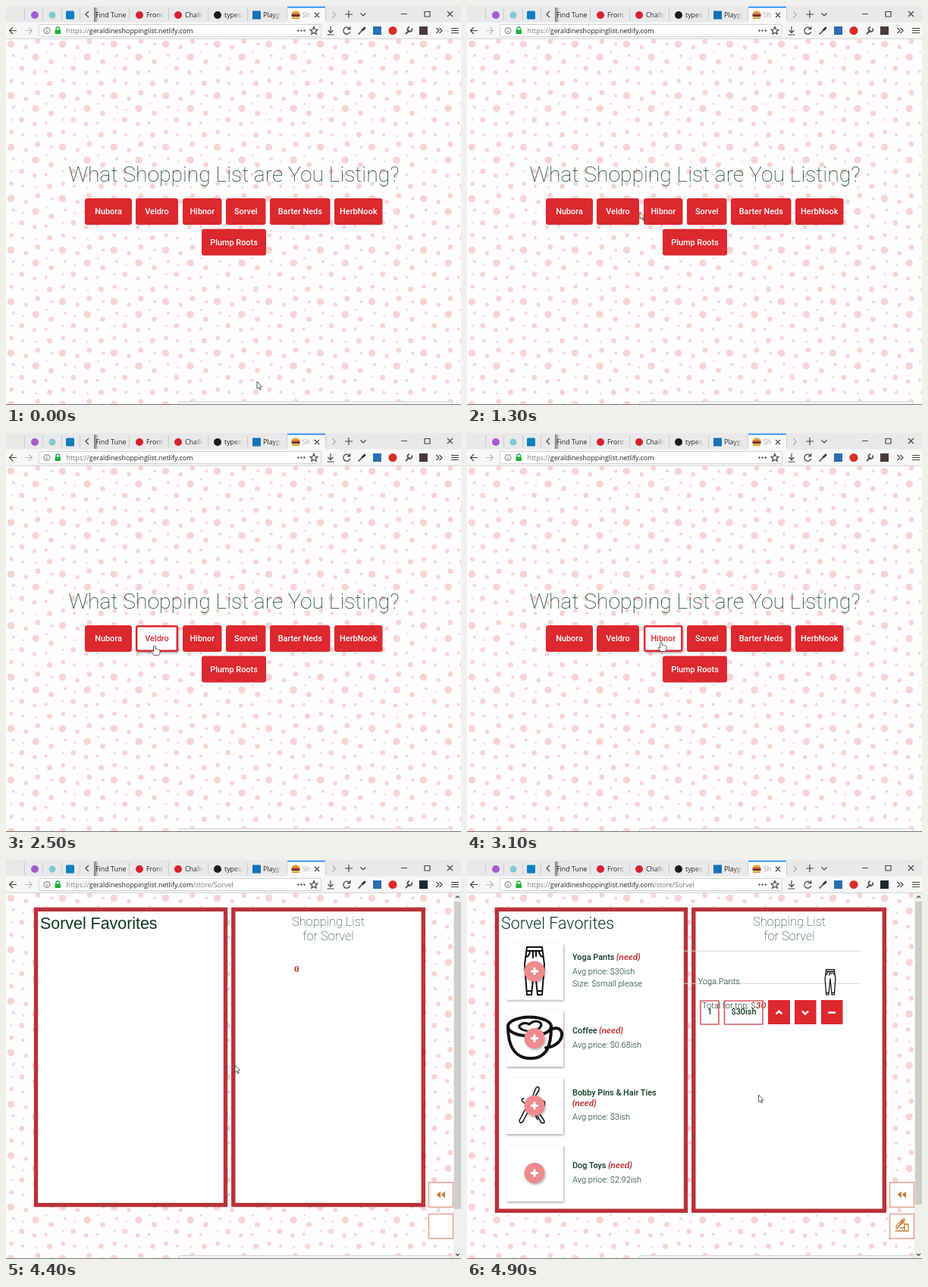
Animation, 600 px wide and 527 px high, one loop 5 s. Source, as an HTML page:

```html
<!DOCTYPE html>
<html lang="en">
<head>
<meta charset="utf-8">
<title>Shopping list</title>
<style>
html, body { margin: 0; width: 100%; height: 100%; overflow: hidden; background: #fff; }
svg { display: block; width: 600px; height: 527px; font-family: Roboto, sans-serif; }
.ui { font-family: "Open Sans", "Noto Sans", sans-serif; font-size: 8.9px; fill: #222; }
.line { fill: none; stroke: #444; stroke-width: 1.2; }
.mid { text-anchor: middle; }
.label { font-size: 10.9px; font-weight: 500; text-anchor: middle; }
.thin { font-weight: 100; fill: #0c3b22; text-anchor: middle; }
.name { font-size: 10.9px; font-weight: 500; fill: #0c3b22; }
.info { font-size: 11.1px; font-weight: 300; fill: #0c3b22; }
.need { font: italic 700 12.2px Lato, sans-serif; fill: #c22f35; }
.ink { fill: none; stroke: #111; stroke-linecap: round; stroke-linejoin: round; }
</style>
</head>
<body>
<svg viewBox="0 0 600 527">
  <defs>
    <pattern id="dots" x="-1" y="43" width="68" height="68" patternUnits="userSpaceOnUse"></pattern>
    <linearGradient id="fade">
      <stop offset="0" stop-color="#e9e9ec" stop-opacity="0"/>
      <stop offset="1" stop-color="#e9e9ec"/>
    </linearGradient>
    <linearGradient id="shade">
      <stop offset="0" stop-color="#777"/>
      <stop offset="1" stop-color="#e9e9ec"/>
    </linearGradient>
    <filter id="shadow" x="-20%" y="-20%" width="150%" height="150%">
      <feDropShadow dx="1" dy="1.5" stdDeviation="1.5" flood-color="#000" flood-opacity=".35"/>
    </filter>
    <g id="pants" class="ink">
      <path d="M-10-31H10L13-8 10 32H4L0-8-4 32H-10L-13-8ZM-10-26H10M-2-25V-17M2-25V-19M-10 27H-4M4 27H10M-11-18Q-7-19-6-25M11-18Q7-19 6-25"/>
    </g>
    <g id="plus">
      <circle r="13.5" fill="#ee8b8d" filter="url(#shadow)"/>
      <path d="M-5 0H5M0-5V5" stroke="#fff" stroke-width="3"/>
    </g>
  </defs>

  <rect y="43" width="600" height="484" fill="#fffdfe"/>
  <rect y="43" width="600" height="484" fill="url(#dots)"/>

  <g id="home">
    <text class="thin" x="300.5" y="232" font-size="28.3">What Shopping List are You Listing?</text>
    <g id="stores"></g>
  </g>

  <g id="store">
    <rect x="590" y="43" width="10" height="484" fill="#f0f0f0"/>
    <rect id="thumb" x="591" y="55" width="9" fill="#cdcdcd"/>
    <path d="M593 50 595.5 47.500 598 50M593 520 595.5 522.500 598 520" class="line"/>
    <g fill="#fff" stroke="#b93238" stroke-width="5.4">
      <rect id="left" x="39.500" y="65.300"/>
      <rect id="right" y="65.300"/>
    </g>
    <text id="heading" x="45" y="91" font-size="21.4" fill="#0c3b22">Sorvel Favorites</text>
    <g class="thin" font-size="16.4">
      <text x="425" y="87">Shopping List</text>
      <text x="425" y="106">for Sorvel</text>
    </g>
    <text id="zero" x="380" y="148" style="font:700 13px 'Liberation Serif',serif" fill="#c22f35">0</text>

    <g id="loaded">
      <g id="items"></g>
      <path d="M285 120.200H518M285 163.200H518" stroke="#d5d2c6"/>
      <text id="total" class="info" x="310"><tspan>Total for trip: $</tspan><tspan id="sum" class="need"></tspan><tspan> ish</tspan></text>
      <g id="entry">
        <text class="info" x="304.500" y="164">Yoga Pants</text>
        <use href="#pants" transform="translate(479 161) scale(.53)" stroke-width="2.4"/>
        <g fill="none" stroke="#dd5a5e" stroke-width="1.6">
          <path d="M308 186H332V217H308ZM339.500 186H390V217H339.500Z"/>
        </g>
        <text class="name mid" x="320" y="204">1</text>
        <text class="name mid" x="365" y="204">$30ish</text>
        <path d="M397 185H426V217H397ZM432 185H460.500V217H432ZM467 185H495.500V217H467Z" fill="#dd282e"/>
        <path d="M407.500 203.500 411.500 199.500 415.500 203.500M442 199.500 446 203.500 450 199.500M476.500 201.500H486" fill="none" stroke="#fff" stroke-width="2.4"/>
      </g>
    </g>

    <g fill="#fff" stroke="#e8a88f" stroke-width="1.6">
      <rect x="557.500" y="426" width="32" height="32.500"/>
      <rect x="557.500" y="467.500" width="32" height="32.500"/>
    </g>
    <path d="M573 437.500V446.500L567.500 442ZM579 437.500V446.500L573.500 442Z" fill="#c8803f"/>
    <g id="pen" class="ink" style="stroke:#c8803f" stroke-width="1.3">
      <path d="M565 490H576M566 486Q566 481 570 479L575 474Q578 473 577 476L573 481M571 486H576Q578 482 576 479M577 481H582V490H577Z"/>
      <path d="M575 476 567 487" stroke-width="2"/>
    </g>
  </g>

  <g id="browser">
    <rect width="600" height="22" fill="#e9e9ec"/>
    <rect y="21.500" width="600" height="21.500" fill="#f7f7f8"/>
    <path d="M0 43.200H600" stroke="#cfcfd2"/>
    <rect x="371" y="1" width="50" height="21" fill="#f9f9fa"/>
    <rect x="371" y=".8" width="50" height="1.6" fill="#1684f5"/>
    <path d="M24.500 3V19M48.500 3V19M73.500 3V19M97.500 3V19M162.500 3V19M214.500 3V19M266.500 3V19M318.500 3V19M370.500 3V19M421.500 3V19" stroke="#cbcbce"/>
    <rect x="116" y="2" width="6" height="19" fill="url(#shade)"/>
    <circle cx="38" cy="12" r="5" fill="#a55bd0"/>
    <circle cx="61" cy="12" r="4.500" fill="#7fcbd3"/>
    <rect x="79" y="6.500" width="11" height="11" rx="1.500" fill="#0d7fc2"/>
    <path class="line" d="M109 7 105 11 109 15"/>
    <g id="tabs" class="ui"></g>
    <g>
      <path d="M377 10Q377 6.500 382 6.500T387 10Z" fill="#e5a13a"/>
      <path d="M376.500 11H387.500" stroke="#c23b2f" stroke-width="1.800"/>
      <path d="M376.500 13H387.500" stroke="#593116" stroke-width="2"/>
      <path d="M377 14.500H387V17H377Z" fill="#e5a13a"/>
    </g>
    <text class="ui" x="391" y="15" style="fill:#aaa">Sh</text>
    <path class="line" d="M407 9 413 15M413 9 407 15M447 11H457M452 6V16M467.500 9.500 471 13 474.500 9.500M521 10.500H529M552 7.500H559V14H552ZM582 7 589 14M589 7 582 14"/>
    <path class="line" d="M430.500 7.500 434.500 11.500 430.500 15.500" style="stroke:#aaa"/>

    <rect x="43.500" y="24.500" width="372" height="16" rx="1.500" fill="#fff" stroke="#d2d2d5"/>
    <path class="line" d="M14 32.500H4.500M9 28 4.500 32.500 9 37"/>
    <path class="line" d="M25 32.500H34.500M30 28 34.500 32.500 30 37" style="stroke:#bbb"/>
    <circle cx="54" cy="32.500" r="4" fill="none" stroke="#777"/>
    <path d="M54 30V31M54 32V35" stroke="#777"/>
    <rect x="64.500" y="31.500" width="7.500" height="5.500" rx=".8" fill="#1fb13a"/>
    <path d="M66 32V30Q66 28 68.250 28T70.500 30V32" fill="none" stroke="#1fb13a" stroke-width="1.300"/>
    <text class="ui" x="79.500" y="36"><tspan fill="#777">https://</tspan><tspan>geraldineshoppinglist.netlify.com</tspan><tspan id="path" fill="#777"></tspan></text>
    <g fill="#555"><circle cx="385.500" cy="32.500" r="1.200"/><circle cx="389.500" cy="32.500" r="1.200"/><circle cx="393.500" cy="32.500" r="1.200"/></g>
    <path class="line" d="M406 27.500 407.500 31 411 31.300 408.300 33.700 409.200 37.300 406 35.300 402.800 37.300 403.700 33.700 401 31.300 404.500 31Z" stroke-width="1"/>
    <path class="line" d="M428 27V35M424.500 32 428 35.500 431.500 32M423.500 38H432.500"/>
    <path class="line" d="M453 30A4.500 4.500 0 1 0 453.700 34M453.700 27V30.700H450"/>
    <path d="M464.500 37.500 470.500 31.500" stroke="#667" stroke-width="1.800"/>
    <path d="M470.500 31.500 473 29" stroke="#333" stroke-width="2.800" stroke-linecap="round"/>
    <rect x="484" y="27" width="11" height="11" fill="#2c6fae"/>
    <circle cx="510" cy="32.500" r="5.500" fill="#dc2d25"/>
    <path d="M527 37 532 32" stroke="#555" stroke-width="2"/>
    <path d="M535 29.500A3 3 0 1 1 532 28" fill="none" stroke="#555" stroke-width="1.800"/>
    <rect id="addon" x="545" y="27" width="11" height="11"/>
    <path class="line" d="M567.500 29 571 32.500 567.500 36M571.500 29 575 32.500 571.500 36M587 29.500H597M587 32.500H597M587 35.500H597"/>
  </g>

  <path d="M227.500 527V524Q227.500 522.500 229 522.500H586Q588.500 522.500 588.500 525V527Z" fill="#f3f3f4" stroke="#d5d5d8"/>
  <path d="M0 526.500H600" stroke="#777"/>

  <g id="arrow"><path d="M0 0V9.500L2.200 7.600 3.700 11 5.200 10.300 3.700 7H6.500Z" fill="#fff" stroke="#333" stroke-width=".8"/></g>
  <g id="hand"><path d="M-1.300.8Q0-.8 1.300.8V4.300Q2.500 3.500 3.300 4.600 4.600 4 5.200 5.200 6.800 4.800 7 6.300V9.500L5.700 12.500H-.7L-4 7.700Q-3.300 6-1.300 7.800Z" fill="#fff" stroke="#333" stroke-width=".8"/></g>
</svg>
<script>
const LOOP = 5000, STEP = 100, OPEN = 4300, LOADED = 4500, ADDED = 4900;
const RED = '#dd282e';
const $ = id => document.getElementById(id);
const show = (id, on) => $(id).setAttribute('display', on ? 'inline' : 'none');
const set = (el, attrs) => Object.entries(attrs).forEach(([k, v]) => el.setAttribute(k, v));

// bubble wallpaper: centre and radius in a 100-unit tile
const bubbles = [
  [11, 11, 7], [59, 36, 7], [16, 33, 3], [79, 64, 3], [34, 87, 3], [90, 11, 3],
  [12, 82, 4], [40, 17, 4], [63, 5, 5], [57, 66, 4], [86, 87, 5], [32, 58, 5],
  [89, 45, 5], [80, 27, 2], [60, 89, 2], [35, 39, 2], [12, 58, 2]
];
$('dots').innerHTML = '<g transform="scale(.68)" fill="#f8d4d4">' +
  bubbles.map(([x, y, r]) => `<circle cx="${x}" cy="${y}" r="${r}"/>`).join('') + '</g>';

const tabs = [
  ['Find Tune', 118, ''],
  ['Front', 185, '<circle cx="176" cy="12" r="5" fill="#d8202f"/>'],
  ['Challe', 236, '<circle cx="227" cy="12" r="5" fill="#d8202f"/>'],
  ['typesc', 288, '<circle cx="279" cy="12" r="5" fill="#1b1b1b"/>'],
  ['Playgr', 339, '<rect x="325" y="6.5" width="11" height="11" fill="#1273b9"/>']
];
$('tabs').innerHTML = tabs.map(([label, x, icon], i) => icon +
  `<text x="${x}" y="15">${label}</text>` +
  (i ? `<rect x="${x + 13}" y="4" width="11" height="16" fill="url(#fade)"/>` +
       `<rect x="${x + 24}" y="4" width="5" height="16" fill="#e9e9ec"/>` : '')).join('');

// label, x, y, width
const stores = [
  ['Nubora', 104, 254, 62], ['Veldro', 171, 254, 56], ['Hibnor', 233, 254, 51.5],
  ['Sorvel', 290, 254, 52.5], ['Barter Neds', 348, 254, 79.5], ['HerbNook', 433, 254, 63.5],
  ['Plump Roots', 258, 294.5, 85]
];
$('stores').innerHTML = stores.map(([label, x, y, w]) =>
  `<g><rect x="${x + 1.2}" y="${y + 1.2}" width="${w - 2.4}" height="32.6" rx="2" stroke="${RED}" stroke-width="2.4"/>` +
  `<text class="label" x="${x + w / 2}" y="${y + 21.4}">${label}</text></g>`).join('');

const art = [
  '<use href="#pants" x="89" y="146" stroke-width="2"/>',
  `<g class="ink" stroke-width="4"><ellipse cx="82.500" cy="220" rx="28.500" ry="12.500"/>
    <path d="M54 220C54 244 62 262 84 262S111 244 111 220M111 224C119 219 126 224 125 232S115 247 104 248"/>
    <path d="M87 227Q68 225 69 219 75 213 82 217 90 210 97 215 101 221 87 227Z" stroke-width="3"/></g>`,
  `<path class="ink" stroke-width="1.5" d="M92 300Q96 299 95 304L90 312 92 318 86 323 87 330 81 334M91 301 87 311 83 320M77 329Q80 327 81 331L74 345Q70 350 69 344ZM75 315Q71 315 73 319L86 329 93 343M100 318Q104 319 102 325L96 332M94 333 101 343Q104 349 98 347L91 335"/>`,
  ''
];
// name, price, top of card
const items = [
  ['Yoga Pants', '30', 110], ['Coffee', '0.68', 198.5],
  ['Bobby Pins &amp; Hair Ties', '3', 287.5], ['Dog Toys', '2.92', 376.5]
];
$('items').innerHTML = items.map(([name, price, y], i) => {
  const wrap = i === 2, base = y + [22, 30.5, 23.5, 30.5][i];
  const priceY = base + (wrap ? 32 : 19);
  const note = wrap
    ? `</text><text class="need" x="139" y="${base + 14}">(need)`
    : ' <tspan class="need">(need)</tspan>';
  return `<rect x="52" y="${y}" width="75" height="74.5" fill="#fff" filter="url(#shadow)"/>` + art[i] +
    `<use href="#plus" x="89" y="${y + 37}"/>` +
    `<text class="name" x="139" y="${base}">${name}${note}</text>` +
    `<text class="info" x="139" y="${priceY}">Avg price: $${price}ish</text>` +
    (i ? '' : `<text class="info" x="139" y="${priceY + 16}">Size: $small please</text>`);
}).join('');

// pointer path: time, x, y
const path = [
  [0, 331, 496], [600, 325, 297], [1300, 228, 272], [1900, 142, 276], [2500, 196, 281],
  [3100, 256, 276], [3500, 302, 272], [4400, 302, 271], [4700, 89, 147], [4800, 89, 147],
  [4900, 384.5, 310], [LOOP, 384.5, 310]
];
function pointer(t) {
  const i = path.findIndex((p, n) => n && t < p[0]);
  const [t0, x0, y0] = path[i - 1], [t1, x1, y1] = path[i];
  const k = (t - t0) / (t1 - t0), e = k * k * (3 - 2 * k);
  return [x0 + (x1 - x0) * e, y0 + (y1 - y0) * e];
}

function draw(t) {
  const [x, y] = pointer(t);
  const open = t >= OPEN, loaded = t >= LOADED, added = t >= ADDED;
  let over = false;

  [...$('stores').children].forEach((g, i) => {
    const [, bx, by, w] = stores[i];
    const hit = !open && x >= bx && x < bx + w && y >= by && y < by + 35;
    over = over || hit;
    set(g.firstChild, { fill: hit ? '#fff' : RED, filter: hit ? 'url(#shadow)' : 'none' });
    set(g.lastChild, { fill: hit ? RED : '#fff' });
  });
  if (loaded) over = items.some(([, , top]) => Math.hypot(x - 89, y - top - 37) < 13.5);

  show('home', !open);
  show('store', open);
  show('zero', !loaded);
  show('loaded', loaded);
  show('pen', loaded);
  show('entry', added);

  const h = loaded ? 398 : 390.3;
  set($('left'), { width: loaded ? 249 : 250, height: h });
  set($('right'), { x: loaded ? 298.8 : 299.8, width: loaded ? 251.5 : 250.5, height: h });
  set($('thumb'), { height: loaded ? 400 : 406 });
  $('heading').style.cssText = loaded ? 'font-weight:300' : 'font-family:"Liberation Sans",sans-serif';
  set($('total'), { y: added ? 196 : 146 });
  $('sum').textContent = added ? '30' : '0';
  $('path').textContent = open ? '/store/Sorvel' : '';
  set($('addon'), { fill: open ? '#20282d' : '#4a3a3a' });

  const at = { transform: `translate(${x} ${y})` };
  set($('arrow'), at);
  set($('hand'), at);
  show('arrow', !over);
  show('hand', over);
}

const start = performance.now();
function tick() {
  const t = (performance.now() - start) % LOOP;
  draw(Math.floor(t / STEP) * STEP);
  requestAnimationFrame(tick);
}
tick();
</script>
</body>
</html>
```
